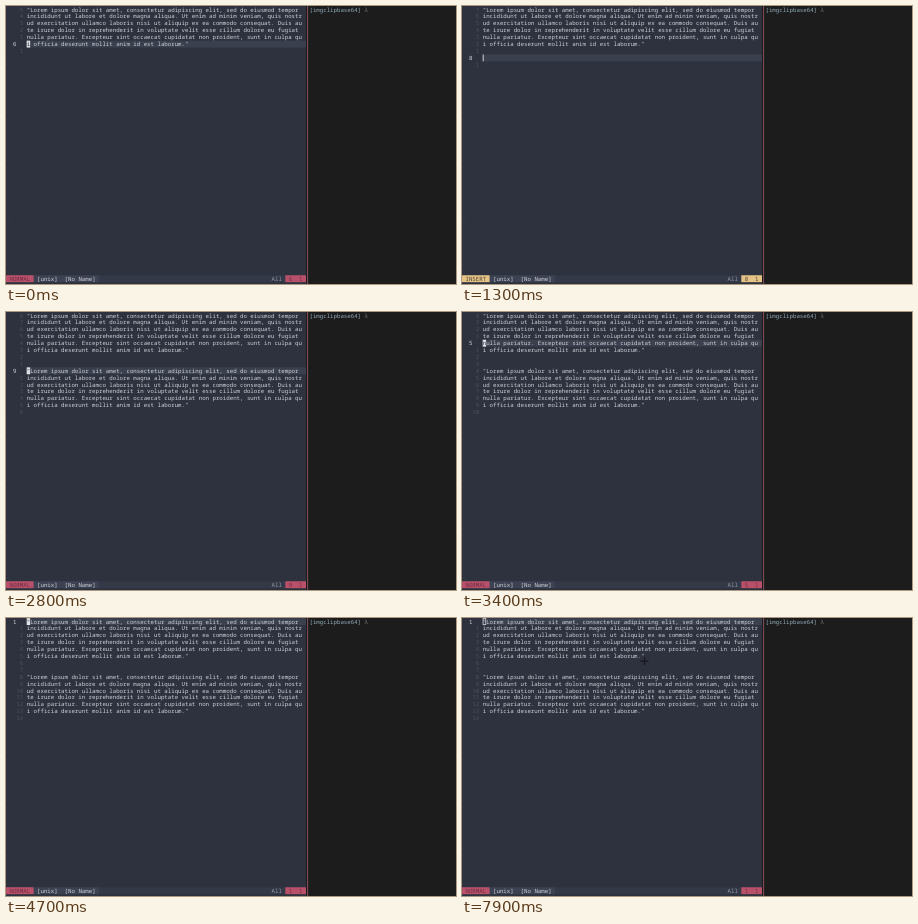
An HTML page with a canvas that plays this animation: 450x278 px, repeating every 8 s.

```html
<!DOCTYPE html>
<html lang="en">
<head>
<meta charset="utf-8">
<title>Terminal editor</title>
<style>
  html, body { margin: 0; width: 100%; height: 100%; overflow: hidden; background: #2e323e; }
  canvas { display: block; width: 450px; height: 278px; }
</style>
</head>
<body>
<canvas id="stage"></canvas>
<script>
const W = 450, H = 278, LOOP = 8000;
// The editor is 87 cells wide; the split takes one more
const SPLIT = 300, CELL = SPLIT / 87, ROW = 6.9, TOP = 0.15;
const TEXT_COL = 6, SHELL_COL = 88, STATUS_ROW = 39;

const COLOR = {
  bg: '#2e323e', line: '#3b404e', text: '#cdd1d8', dim: '#4a505e', tilde: '#3d4350',
  number: '#d5d9df', cursor: '#dfe2e7', bar: '#343947', file: '#3c4252', all: '#9098a6',
  shell: '#1c1c1d', border: '#85505c', prompt: '#92adb8', lambda: '#6d7674'
};
const MODES = {
  NORMAL: { fill: '#b9506a', ink: '#6c2e41' },
  INSERT: { fill: '#e5c385', ink: '#4c4438' }
};

const LOREM = [
  '"Lorem ipsum dolor sit amet, consectetur adipiscing elit, sed do eiusmod tempor',
  'incididunt ut labore et dolore magna aliqua. Ut enim ad minim veniam, quis nostr',
  'ud exercitation ullamco laboris nisi ut aliquip ex ea commodo consequat. Duis au',
  'te irure dolor in reprehenderit in voluptate velit esse cillum dolore eu fugiat',
  'nulla pariatur. Excepteur sint occaecat cupidatat non proident, sunt in culpa qu',
  'i officia deserunt mollit anim id est laborum."'
];

// Moments of each key press, in ms
const OPEN = 600, ENTER = 1300, ESCAPE = 1600, PASTE = 2400, CLIMB = 3225, STEP = 50;
const BLUR = 7200, POINTER = 7400;

const canvas = document.getElementById('stage');
const ctx = canvas.getContext('2d');
const dpr = window.devicePixelRatio || 1;
canvas.width = Math.round(W * dpr);
canvas.height = Math.round(H * dpr);
ctx.scale(dpr, dpr);

const rowTop = row => TOP + row * ROW;

function rect(x, y, w, h, color) {
  ctx.fillStyle = color;
  ctx.fillRect(x, y, w, h);
}

function cells(col, row, count, color) {
  rect(col * CELL, rowTop(row), count * CELL, ROW, color);
}

function write(str, col, row, color) {
  ctx.fillStyle = color;
  ctx.fillText(str, col * CELL, rowTop(row) + 5.35);
}

function editorState(t) {
  const state = { mode: 'NORMAL', row: 5, lines: [...LOREM, ''] };
  if (t >= OPEN) {
    state.row = 6;
    state.lines.push('');
    state.mode = t < ESCAPE ? 'INSERT' : 'NORMAL';
  }
  if (t >= ENTER) {
    state.row = 7;
    state.lines.push('');
  }
  if (t >= PASTE) {
    state.lines.splice(8, 0, ...LOREM);
    state.row = 8;
  }
  if (t >= CLIMB) state.row = Math.max(0, 7 - Math.floor((t - CLIMB) / STEP));
  return state;
}

function drawCursor(state, t) {
  const x = TEXT_COL * CELL, y = rowTop(state.row);
  if (state.mode === 'INSERT') {
    rect(x, y, 0.9, ROW, COLOR.cursor);
  } else if (t >= BLUR) {
    ctx.strokeStyle = COLOR.cursor;
    ctx.lineWidth = 0.7;
    ctx.strokeRect(x + 0.35, y + 0.35, CELL - 0.7, ROW - 0.7);
  } else if (t < ESCAPE || t >= PASTE) {
    cells(TEXT_COL, state.row, 1, COLOR.cursor);
    write(state.lines[state.row].slice(0, 1), TEXT_COL, state.row, COLOR.bg);
  }
}

function drawEditor(state, t) {
  rect(0, 0, SPLIT, H, COLOR.bg);
  cells(TEXT_COL, state.row, 87 - TEXT_COL, COLOR.line);
  state.lines.forEach((line, row) => {
    write(line, TEXT_COL, row, COLOR.text);
    if (row === state.row) {
      write(String(row + 1), 2, row, COLOR.number);
    } else {
      const label = String(Math.abs(row - state.row));
      write(label, 5 - label.length, row, COLOR.dim);
    }
  });
  for (let row = state.lines.length; row < STATUS_ROW; row++) write('~', 0, row, COLOR.tilde);
  drawCursor(state, t);
}

function drawStatus(state) {
  const { fill, ink } = MODES[state.mode];
  cells(0, STATUS_ROW, 87, COLOR.bar);
  cells(0, STATUS_ROW, 27, COLOR.file);
  cells(0, STATUS_ROW, 8, fill);
  cells(81, STATUS_ROW, 6, fill);
  write(state.mode, 1, STATUS_ROW, ink);
  write('[unix]', 9, STATUS_ROW, COLOR.text);
  write('[No Name]', 17, STATUS_ROW, COLOR.text);
  write('All', 77, STATUS_ROW, COLOR.all);
  write((state.row + 1) + '  1', 82, STATUS_ROW, ink);
}

function drawShell() {
  rect(SPLIT, 0, W - SPLIT, H, COLOR.shell);
  rect(SPLIT + 1.1, 0, 1, H, COLOR.border);
  write('[imgclipbase64]', SHELL_COL, 0, COLOR.prompt);
  write('λ', SHELL_COL + 16, 0, COLOR.lambda);
}

function drawPointer(x, y) {
  rect(x - 4, y - 0.5, 8, 1.2, '#14161b');
  rect(x - 0.5, y - 4, 1.2, 8, '#14161b');
}

function draw(t) {
  ctx.font = `${CELL / 0.6}px "Noto Sans Mono", "DejaVu Sans Mono", monospace`;
  ctx.textRendering = 'geometricPrecision';
  ctx.textBaseline = 'alphabetic';
  const state = editorState(t);
  drawEditor(state, t);
  drawStatus(state);
  drawShell();
  if (t >= POINTER) drawPointer(182.5, 43);
}

const start = performance.now();
function frame() {
  draw((performance.now() - start) % LOOP);
  requestAnimationFrame(frame);
}
frame();
</script>
</body>
</html>
```
